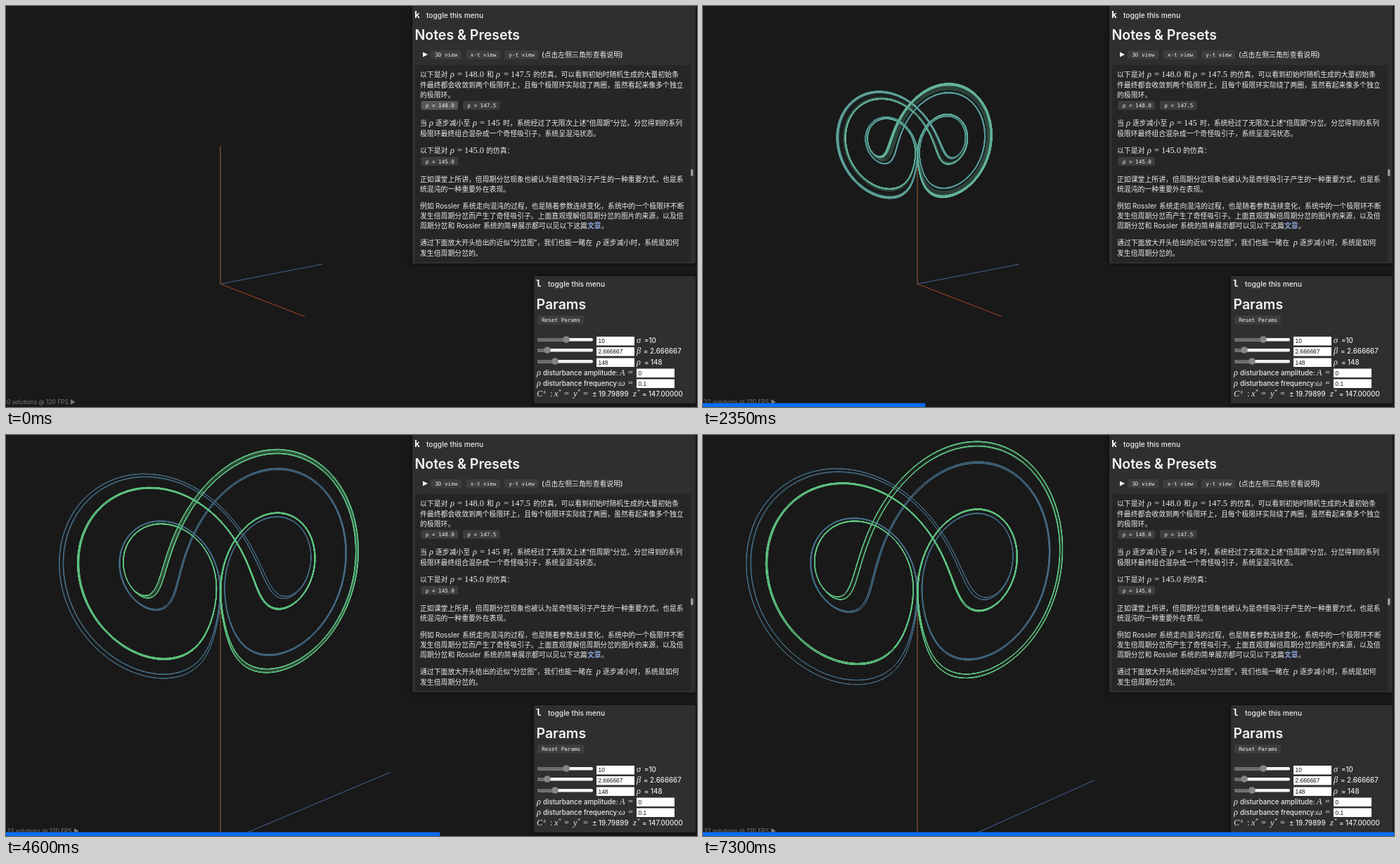
An HTML page with a canvas for the animation above (7.35 s loop, 983x570 px).

```html
<!DOCTYPE html>
<html lang="zh">
<head>
<meta charset="utf-8">
<style>
html, body { margin: 0; width: 100%; height: 100%; overflow: hidden; background: #191919; }
canvas, svg { position: absolute; left: 0; top: 0; width: 983px; height: 570px; }
text { font: 9.87px Inter, "Noto Sans CJK SC", "Noto Sans CJK", sans-serif; fill: #ececec; white-space: pre; }
.ui { font-size: 9.7px; font-weight: 500; }
.menu { font-size: 10.2px; font-weight: 500; }
.head { font-size: 19.5px; font-weight: 600; fill: #f4f4f4; }
.bold { font-weight: 500; }
.link { font-weight: 600; fill: #8ea6de; }
.math { font: italic 12.4px "Liberation Serif", serif; }
.num { font: 12.4px "Liberation Serif", serif; }
.sup { font: 8px "Liberation Serif", serif; }
.key { font: bold 13px "DejaVu Sans Mono", monospace; fill: #fff; }
.btn { font: 7.6px "DejaVu Sans Mono", monospace; fill: #f0f0f0; }
.field { font: 8.4px "Liberation Sans", sans-serif; fill: #111; }
.status { font-size: 8.4px; fill: #7c7c7c; }
</style>
</head>
<body>
<canvas id="view" width="983" height="570"></canvas>
<svg id="ui" viewBox="0 0 983 570"></svg>
<script>
const LOOP = 7350, STEP = 50;
const svg = document.getElementById('ui');
const ctx = document.getElementById('view').getContext('2d');

// ---------- interface ----------
function add(tag, attrs, content) {
  const el = document.createElementNS('http://www.w3.org/2000/svg', tag);
  for (const key in attrs) el.setAttribute(key, attrs[key]);
  if (content !== undefined) el.textContent = content;
  svg.appendChild(el);
  return el;
}
const rect = (x, y, width, height, fill, rx = 0) => add('rect', { x, y, width, height, fill, rx });
const label = (x, y, str, cls = '') => add('text', { x, y, class: cls }, str);
const line = (y, ...parts) => parts.map(([x, str, cls]) => label(x, y, str, cls));

function button(x, y, width, str) {
  const box = rect(x, y, width, 12.5, '#3d3d3d', 2.5);
  label(x + 6.3, y + 9, str, 'btn');
  return box;
}
function panel(x, y, width, height) {
  const box = rect(x, y, width, height, '#2f2f2f', 2);
  box.style.filter = 'drop-shadow(0 0 3px #0a0a0a)';
}
function field(x, y, str) {
  rect(x, y, 54, 12.5, '#fff');
  label(x + 2.5, y + 9.3, str, 'field');
}
function slider(y, knob) {
  rect(756, y - 2, 79, 4.5, '#f2f2f2', 2);
  rect(756, y - 2, knob - 756, 4.5, '#6b6b6b', 2);
  add('circle', { cx: knob, cy: y, r: 4.8, fill: '#858585' });
}

const status = label(1, 566, '', 'status');

panel(578, -4, 403, 370);
label(581, 17, 'k', 'key');
label(598, 17, 'toggle this menu', 'menu');
label(581.5, 48, 'Notes & Presets', 'head');
add('path', { d: 'M593 65.5 L600 69 L593 72.5Z', fill: '#fff' });
button(604, 63, 44, '3D view');
button(654.5, 63, 48.5, 'x-t view');
button(709, 63, 48, 'y-t view');
label(762, 72.5, '(点击左侧三角形查看说明)', 'bold');
rect(582, 84, 392, 280, '#262626', 2);
rect(974, 232, 3.5, 10, '#9a9a9a', 1.7);

line(101, [589, '以下是对'], [632, 'ρ', 'math'], [642, '= 148.0', 'num'], [684, '和'],
  [697, 'ρ', 'math'], [708, '= 147.5', 'num'], [750, '的仿真，可以看到初始时随机生成的大量初始条']);
line(116, [589, '件最终都会收敛到两个极限环上，且每个极限环实际绕了两圈，虽然看起来像多个独立']);
line(130, [589, '的极限环。']);
const preset = button(590.5, 135, 52.5, 'ρ = 148.0');
button(650, 135, 52.5, 'ρ = 147.5');
line(170, [589, '当'], [602, 'ρ', 'math'], [611, '逐步减小至'], [664, 'ρ', 'math'], [674, '= 145', 'num'],
  [707, '时，系统经过了无限次上述“倍周期”分岔。分岔得到的系列']);
line(185, [589, '极限环最终组合混杂成一个奇怪吸引子，系统呈混沌状态。']);
line(209, [589, '以下是对'], [632, 'ρ', 'math'], [642, '= 145.0', 'num'], [683, '的仿真：']);
button(590.5, 214.5, 52.5, 'ρ = 145.0');
line(250, [589, '正如课堂上所讲，倍周期分岔现象也被认为是奇怪吸引子产生的一种重要方式，也是系']);
line(264, [589, '统混沌的一种重要外在表现。']);
line(288, [589, '例如'], [611, 'Rossler'], [649, '系统走向混沌的过程，也是随着参数连续变化，系统中的一个极限环不断']);
line(302, [589, '发生倍周期分岔而产生了奇怪吸引子。上面直观理解倍周期分岔的图片的来源，以及倍']);
line(316, [589, '周期分岔和'], [641, 'Rossler'], [679, '系统的简单展示都可以见以下这篇'], [827, '文章', 'link'], [847, '。']);
line(340, [589, '通过下面放大开头给出的近似“分岔图”，我们也能一睹在'], [840, 'ρ', 'math'], [849, '逐步减小时，系统是如何']);
line(355, [589, '发生倍周期分岔的。']);

panel(751, 384, 230, 181);
label(754, 399, 'l', 'key');
label(771, 399, 'toggle this menu', 'menu');
label(754.5, 431, 'Params', 'head');
button(756, 440, 66, 'Reset Params');
slider(474, 797);
slider(489, 770);
slider(505, 781);
field(840, 470, '10');
field(840, 485, '2.666667');
field(840, 500.5, '148');
line(479, [897, 'σ', 'math'], [908, '=10', 'ui']);
line(494, [897, 'β', 'math'], [907, '= 2.666667', 'ui']);
line(510, [897, 'ρ', 'math'], [908, '= 148', 'ui']);
line(525, [755, 'ρ', 'math'], [764, 'disturbance amplitude:', 'ui'], [873, 'A', 'math'], [885, '=', 'num']);
line(540, [755, 'ρ', 'math'], [764, 'disturbance frequency:', 'ui'], [872, 'ω', 'math'], [885, '=', 'num']);
field(897, 515.5, '0');
field(897, 530.5, '0.1');
line(555, [755, 'C', 'math'], [774, ':', 'num'], [780, 'x', 'math'], [794, '=', 'num'], [807, 'y', 'math'],
  [821, '=', 'num'], [834, '± 19.79899', 'ui'], [892, 'z', 'math'], [905, '= 147.00000', 'ui']);
line(551, [764, '±', 'sup'], [786, '*', 'sup'], [813, '*', 'sup'], [898, '*', 'sup']);

const bar = rect(0, 564.5, 0, 5.5, '#0a6cf5');

// ---------- Lorenz system ----------
const SIGMA = 10, BETA = 8 / 3, RHO = 148;
const DT = 0.0035, SPEED = 5.5, START = 0.1, COUNT = 32;
const TOTAL = Math.ceil((LOOP / 1000 - START) * SPEED / DT) + 2;

let seed = 20;
function random() {
  seed = (seed * 1664525 + 1013904223) >>> 0;
  return seed / 4294967296;
}
const spread = r => (random() * 2 - 1) * r;
const flow = ([x, y, z]) => [SIGMA * (y - x), x * (RHO - z) - y, x * y - BETA * z];
const move = (p, k, h) => [p[0] + k[0] * h, p[1] + k[1] * h, p[2] + k[2] * h];
function rk4(p, h) {
  const a = flow(p), b = flow(move(p, a, h / 2)), c = flow(move(p, b, h / 2)), d = flow(move(p, c, h));
  return p.map((v, i) => v + h / 6 * (a[i] + 2 * b[i] + 2 * c[i] + d[i]));
}

const BLUE = [72, 110, 134], GREEN = [98, 194, 130];
const mix = (a, b, k) => a + (b - a) * k;
const mixRgb = (a, b, k) => a.map((v, i) => mix(v, b[i], k));

function solve() {
  const path = new Float32Array(TOTAL * 3);
  let p = [spread(60), spread(150), 147 + spread(150)], low = 0, high = 0;
  for (let i = 0; i < TOTAL; i++) {
    path.set(p, i * 3);
    if (i > TOTAL * 0.75) {
      const side = p[0] + 1.7 * p[1];
      low = Math.min(low, side);
      high = Math.max(high, side);
    }
    p = rk4(p, DT);
  }
  const rightward = high + low > 0;
  const tint = mixRgb([66, 130, 164], [128, 206, 150], random());
  return { path, rightward, tint };
}
const solutions = Array.from({ length: COUNT }, solve).sort((a, b) => a.rightward - b.rightward);

// ---------- camera ----------
const FOCAL = 620, ASPECT = 1.05, CX = 305, CY = 199, TARGET_Z = 144;
const TURN = 51.5 * Math.PI / 180, TILT = -0.06;
const FAR = 455, CLOSE = 176, MID = 225;
function ease(t, from, to) {
  const k = Math.min(1, Math.max(0, (t - from) / (to - from)));
  return k * k * (3 - 2 * k);
}
const zoom = (from, to, k) => from * Math.pow(to / from, k);
function camera(t) {
  const dist = zoom(zoom(FAR, CLOSE, ease(t, 4.1, 4.9)), MID, ease(t, 5.4, 5.95));
  const a = Math.cos(TURN), b = Math.sin(TURN);
  const c = Math.cos(TILT), s = Math.sin(TILT);
  const out = [0, 0];
  return (x, y, z) => {
    const v = b * x - a * y, u = z - TARGET_Z;
    const scale = FOCAL / (dist - v * c - u * s);
    out[0] = CX + (a * x + b * y) * scale * ASPECT;
    out[1] = CY - (u * c - v * s) * scale;
    return out;
  };
}

// ---------- drawing ----------
const BASE = 2.5;
const AXES = [[119, -13, BASE, '#a8441f'], [0, 154, BASE, '#45639c'], [0, 0, TARGET_Z, '#a0653a']];
function drawAxes(project) {
  ctx.globalAlpha = 1;
  ctx.lineWidth = 1;
  for (const [x, y, z, color] of AXES) {
    ctx.strokeStyle = color;
    ctx.beginPath();
    ctx.moveTo(...project(0, 0, BASE));
    ctx.lineTo(...project(x, y, z));
    ctx.stroke();
  }
}

function drawTrails(t, project) {
  const head = Math.min(TOTAL - 1, Math.floor((t - START) * SPEED / DT));
  if (head < 1) return;
  const bands = 12;
  const size = mix(2, 1, ease(t, 3, 4)) * SPEED / DT / bands;
  const settled = ease(t, 1.9, 3.8);
  ctx.lineWidth = 0.75;
  for (const { path, rightward, tint } of solutions) {
    const rgb = mixRgb(tint, rightward ? GREEN : BLUE, settled).map(Math.round);
    ctx.strokeStyle = `rgb(${rgb})`;
    const at = i => project(path[i * 3], path[i * 3 + 1], path[i * 3 + 2]);
    for (let k = bands - 1; k >= 0; k--) {
      const hi = Math.floor(head - size * k);
      if (hi < 1) continue;
      const lo = Math.max(0, Math.floor(head - size * (k + 1)));
      const stride = k < bands / 2 ? 1 : 2;
      ctx.globalAlpha = 0.62 * (1 - (k + 0.5) / bands) ** 2;
      ctx.beginPath();
      ctx.moveTo(...at(lo));
      for (let i = lo - lo % stride + stride; i < hi; i += stride) {
        const q = at(i);
        ctx.lineTo(q[0], q[1]);
      }
      ctx.lineTo(...at(hi));
      ctx.stroke();
    }
  }
}

function render(frame) {
  const t = frame * STEP / 1000, project = camera(t);
  ctx.globalAlpha = 1;
  ctx.fillStyle = '#191919';
  ctx.fillRect(0, 0, 983, 570);
  drawAxes(project);
  drawTrails(t, project);
  status.textContent = (t < START ? 0 : COUNT) + ' solutions @ 120 FPS ▶';
  preset.setAttribute('fill', t < 1.2 ? '#575757' : '#3d3d3d');
  const last = LOOP / STEP - 1;
  bar.setAttribute('width', frame === 0 ? 0 : frame === last ? 983 : 2 + frame * 983 / (last + 1));
}

const begin = performance.now();
let shown = -1;
function tick() {
  const frame = Math.floor(((performance.now() - begin) % LOOP) / STEP);
  if (frame !== shown) render(shown = frame);
  requestAnimationFrame(tick);
}
tick();
</script>
</body>
</html>
```
